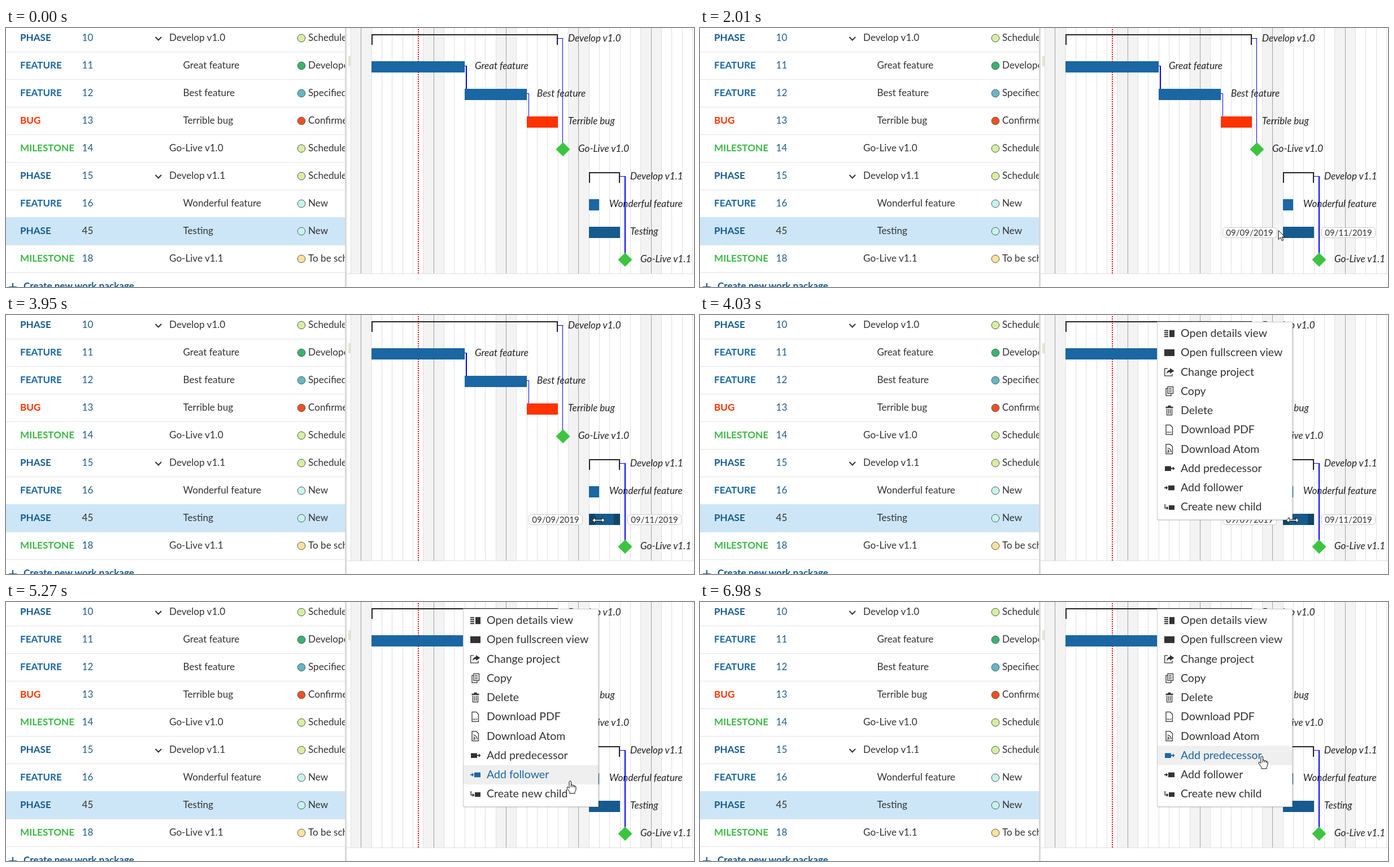
Write an HTML page that moves like this. It is 1218x460 px and loops after 8 s.

```html
<!DOCTYPE html>
<html lang="en">
<head>
<meta charset="utf-8">
<title>Gantt chart</title>
<style>
  html, body { margin: 0; width: 100%; height: 100%; overflow: hidden; background: #fff; }
  svg { display: block; font: 17.1px Lato, sans-serif; fill: #333; }
  .type, .create { font-weight: bold; }
  .label { font-style: italic; fill: #222; }
  .tip { font-size: 15.1px; text-anchor: middle; }
  .item { font-size: 19.55px; color: #333; fill: currentColor; }
  .item .back { fill: none; }
  .item.on { color: #1a67a3; }
  .item.on .back { fill: #efefef; }
  .line { fill: none; stroke: currentColor; stroke-width: 1.3; }
  .cursor { fill: #fff; stroke: #000; stroke-linejoin: round; }
</style>
</head>
<body>
<svg id="stage" width="1218" height="460" viewBox="0 0 1218 460"></svg>
<script>
const LOOP = 8000, ROW = 49, DAY = 18.335, MENU_ROW = 34.25;
const COLORS = { PHASE: '#175a8e', FEATURE: '#1a67a3', BUG: '#ff3300', MILESTONE: '#3cc440' };
const STATUS = {
  Scheduled: '#d8eea0', Developed: '#38b36e', Specified: '#64b7c4',
  Confirmed: '#ee5022', New: '#c4f6ec', 'To be scheduled': '#ffe29c'
};
// type, id, subject, level, status, first day, end day (counted from 9 September)
const rows = [
  ['PHASE', 10, 'Develop v1.0', 0, 'Scheduled', -21, -3],
  ['FEATURE', 11, 'Great feature', 1, 'Developed', -21, -12],
  ['FEATURE', 12, 'Best feature', 1, 'Specified', -12, -6],
  ['BUG', 13, 'Terrible bug', 1, 'Confirmed', -6, -3],
  ['MILESTONE', 14, 'Go-Live v1.0', 0, 'Scheduled', -3, -2],
  ['PHASE', 15, 'Develop v1.1', 0, 'Scheduled', 0, 3],
  ['FEATURE', 16, 'Wonderful feature', 1, 'New', 0, 1],
  ['PHASE', 45, 'Testing', 1, 'New', 0, 3],
  ['MILESTONE', 18, 'Go-Live v1.1', 0, 'To be scheduled', 3, 4]
];

const rect = (x, y, w, h, fill, more = '') =>
  `<rect x="${x}" y="${y}" width="${w}" height="${h}" ${fill && `fill="${fill}"`} ${more}/>`;
const path = (d, more = '') => `<path d="${d}" ${more}/>`;
const text = (x, y, s, more = '') => `<text x="${x}" y="${y}" ${more}>${s}</text>`;
const group = (id, body, more = '') => `<g id="${id}" ${more}>${body}</g>`;
const dayX = d => Math.round(1031.7 + d * DAY);
const isParent = row => row[0] === 'PHASE' && !row[3];
const isMilestone = row => row[0] === 'MILESTONE';

function tableRow(row, i) {
  const [type, id, subject, level, status] = row, y = 23 + i * ROW, lineY = 42 + i * ROW;
  return (id === 45 ? rect(0, lineY - ROW, 600, ROW, '#cce6f8') : '') +
    rect(0, lineY, 600, 1, '#e4e4e4') +
    text(25, y, type, `class="type" fill="${type === 'MILESTONE' ? '#3cb846' : COLORS[type]}"`) +
    text(134.5, y, id, id === 45 ? '' : 'fill="#1f5f8f"') +
    (isParent(row) ? path(`M264.5 ${y - 7}l5.3 5.5 5.3 -5.5`, 'fill="none" stroke="#333" stroke-width="2"') : '') +
    text(289 + level * 24.5, y, subject) +
    `<circle cx="523" cy="${y - 5}" r="6.8" fill="${STATUS[status]}" stroke="#555"/>` +
    text(535, y, status);
}

function chartRow(row, i) {
  const [type, , subject, , , from, to] = row, y = 10 + i * ROW;
  const x = dayX(from), end = dayX(to);
  const shape = isMilestone(row)
    ? path(`M${(x + end) / 2} ${y - 3}l12.500 12.500 -12.500 12.500 -12.500 -12.500z`, `fill="${COLORS[type]}"`)
    : isParent(row)
      ? path(`M${x + 1} ${y + 20}V${y + 2}H${end - 1}V${y + 20}`, 'fill="none" stroke="#222" stroke-width="2"')
      : rect(x, y, end - x, 20, COLORS[type]);
  return shape + text(end + 18, y + 14, subject, 'class="label"');
}

function dayLines() {
  let bands = '', lines = '';
  for (let k = 0; k < 34; k++) {
    const x = Math.round(610 + k * DAY);
    if (k % 7 === 0) bands += rect(x, 0, 37, 436, '#f3f3f3');
    lines += rect(x, 0, 1, 436, k % 7 === 1 ? '#a0a0a0' : '#e0e0e0');
  }
  return bands + lines;
}

const relations =
  path('M977 18.5H986.5M985.5 18V206M812 67.5H815M922 116.5H925M925.5 116V158M1087 263.5H1096', 'stroke="#00f" fill="none"') +
  path('M815 67V108M1096 263V402', 'stroke="#00f" stroke-width="2"');

function tips(row, i) {
  const [, , , , , from, to] = row, y = 11.5 + i * ROW;
  const tip = (x, day) => {
    const date = new Date(Date.UTC(2019, 8, 9 + day));
    const two = n => String(n).padStart(2, '0');
    return rect(x, y, 95, 18, '#fff', 'rx="5" stroke="#ccc"') +
      text(x + 47.5, y + 14.5, `${two(date.getUTCMonth() + 1)}/${two(date.getUTCDate())}/2019`, 'class="tip"');
  };
  const left = dayX(from) - 106.5 - (isParent(row) ? 24 : 0);
  const right = dayX(to) + (isMilestone(row) ? 25.5 : 13.5);
  return group('tip' + i, (isMilestone(row) ? '' : tip(left, from)) + tip(right, to - 1));
}

// Icons are drawn around the vertical middle of their menu line, x from 0 to 18.
const line = d => path(d, 'class="line"');
const page = 'M3 -8.500H10.500L14.500 -4.500V8.500H3Z';
const menu = [
  ['Open details view', path('M0 -6h7v2H0zM0 -2.500h7v2H0zM0 1h7v2H0zM0 4.500h7v2H0zM9 -6h9V6.500H9z')],
  ['Open fullscreen view', path('M0 -6H18V6H0z')],
  ['Change project', line('M6 -6H.7V7H14V3') + path('M10 -7l7.500 5 -7.500 5V0Q6 0 4 3.500 4.500 -3.500 10 -4z')],
  ['Copy', line('M6 -8H15.500V4H6zM6 -5H3V8H12V4M8 -5h5M8 -2h5M8 1h5')],
  ['Delete', path('M2.500 -7H6.500V-9H11.500V-7H15.500V-4.500H2.500z') + line('M4.500 -3.500V8H13.500V-3.500M7.500 -3V6M10.500 -3V6')],
  ['Download PDF', line(page) + text(4.2, 6, 'PDF', 'font-size="4.500" font-weight="bold"')],
  ['Download Atom', line(page) + line('M5.500 -2Q12 -1 12 6M5.500 1.500Q8.500 2 8.500 6') + '<circle cx="6.300" cy="5.200" r="1.200"/>'],
  ['Add predecessor', path('M1 -4H12V4.500H1zM12 -1h3v-2.500l3.500 3.500 -3.500 3.500V1h-3z')],
  ['Add follower', path('M7 -4H18V4.500H7zM0 -1h3v-2.500l3.500 3.500 -3.500 3.500V1H0z')],
  ['Create new child', path('M8 -3H18V5H8zM.5 -5H2V1h2v-2.500L7.500 2 4 5V2.500H.5z')]
];
const menuItem = ([label, icon], i) => {
  const y = 32.7 + i * MENU_ROW;
  return group('item' + i,
    rect(810, y - 17, 238, MENU_ROW, '', 'class="back"') +
    `<g transform="translate(822 ${y})">${icon}</g>` + text(851, y + 6.5, label), 'class="item"');
};
const menuBox =
  rect(811, 15, 240, 351, '#000', 'opacity=".04"') + rect(810, 13, 240, 352, '#000', 'opacity=".06"') +
  rect(809.5, 12.5, 239, 351, '#fff', 'stroke="#c8c8c8"') + menu.map(menuItem).join('');

const doubleArrow = r =>
  `M${-r} 0L${5 - r} -5V-1.400H${r - 5}V-5L${r} 0 ${r - 5} 5V1.400H${5 - r}V5Z`;
const cursors = {
  arrow: path('M.5 .5V16.500L4.200 13 6.800 18.800 9.200 17.700 6.600 12H11.700Z'),
  resize: path(doubleArrow(11)),
  move: path(doubleArrow(14), 'transform="rotate(90)"') + path(doubleArrow(14)) + rect(-1.4, -5, 2.8, 10, '#fff', 'stroke="none"'),
  hand: path('M-2 2Q-2 .5 -.2 .5T1.500 2V7.500Q4.200 6.500 4.700 8.300 7.200 7.600 7.500 9.400 10 9 10 11.500V15Q10 18 8 20V22.500H-1V20L-5.800 13.500Q-6.500 10.500 -4 11L-2 13Z') +
    path('M1.500 7.500V11.500M4.700 8.300V11.500M7.500 9.400V12')
};

const stage = document.getElementById('stage');
stage.innerHTML =
  '<clipPath id="table"><path d="M0 0H600V460H0z"/></clipPath>' +
  `<g clip-path="url(#table)">${rows.map(tableRow).join('')}` +
  path('M5 460H19M12 453V468', 'stroke="#175a8e" stroke-width="2"') +
  text(31, 464, 'Create new work package', 'class="create" fill="#175a8e"') + '</g>' +
  dayLines() + rect(600, 0, 3, 460, '#d8d8d8') + rect(606, 50, 4, 18, '#e2e6d4') +
  rect(603, 436, 615, 1, '#e0e0e0') +
  path('M730 0V436', 'stroke="#f00" stroke-width="2" stroke-dasharray="2 2" stroke-dashoffset="2"') +
  relations + rows.map(chartRow).join('') +
  group('grips', rect(1032, 353, 11, 20, '#124566') + rect(1076, 353, 11, 20, '#124566')) +
  rows.map(tips).join('') + group('menu', menuBox) +
  Object.entries(cursors).map(([id, shape]) => group(id, shape, 'class="cursor"')).join('');

// time, x, y, number of steps to the next place (1 holds still)
const track = [
  [850, 990, 13, 5], [1240, 1019, 411, 1], [1320, 1021, 443, 4], [1620, 1023, 373, 1],
  [1700, 1023, 370, 1], [1780, 1023, 366, 1], [1930, 1023, 362, 1], [2010, 1023.5, 359, 1],
  [2560, 1033, 357, 4], [2870, 1049, 364.5, 1], [4810, 1036, 358.5, 6], [5270, 999, 317.5, 4],
  [5570, 995, 311, 1], [6430, 995, 306, 7], [6980, 995, 273.5, 1], [LOOP, 995, 273.5, 1]
];
function pointer(t) {
  const i = track.findIndex((key, n) => n + 1 < track.length && t < track[n + 1][0]);
  const [t0, x0, y0, steps] = track[i], [t1, x1, y1] = track[i + 1];
  const k = Math.floor(steps * (t - t0) / (t1 - t0) + .02) / steps;
  return [x0 + (x1 - x0) * k, y0 + (y1 - y0) * k];
}

const el = id => document.getElementById(id);
const show = (id, on) => el(id).setAttribute('visibility', on ? 'visible' : 'hidden');

function draw(t) {
  const [x, y] = pointer(t);
  const kind = t < 850 ? '' : t < 2560 ? 'arrow' : t >= 4810 ? 'hand' : t >= 3800 && t < 3950 ? 'move' : 'resize';
  const hovered = Math.ceil((y - 42) / ROW);
  for (const id in cursors) {
    show(id, id === kind);
    if (id === kind) el(id).setAttribute('transform', `translate(${x} ${y})`);
  }
  rows.forEach((_, i) => show('tip' + i, kind && kind !== 'hand' && i === hovered));
  show('grips', kind === 'resize' || kind === 'move');
  show('menu', t >= 4030);
  const item = kind === 'hand' ? Math.floor((y - 15.7) / MENU_ROW) : -1;
  menu.forEach((_, i) => el('item' + i).classList.toggle('on', i === item));
}

function tick() {
  draw(performance.now() % LOOP);
  requestAnimationFrame(tick);
}
tick();
</script>
</body>
</html>
```
